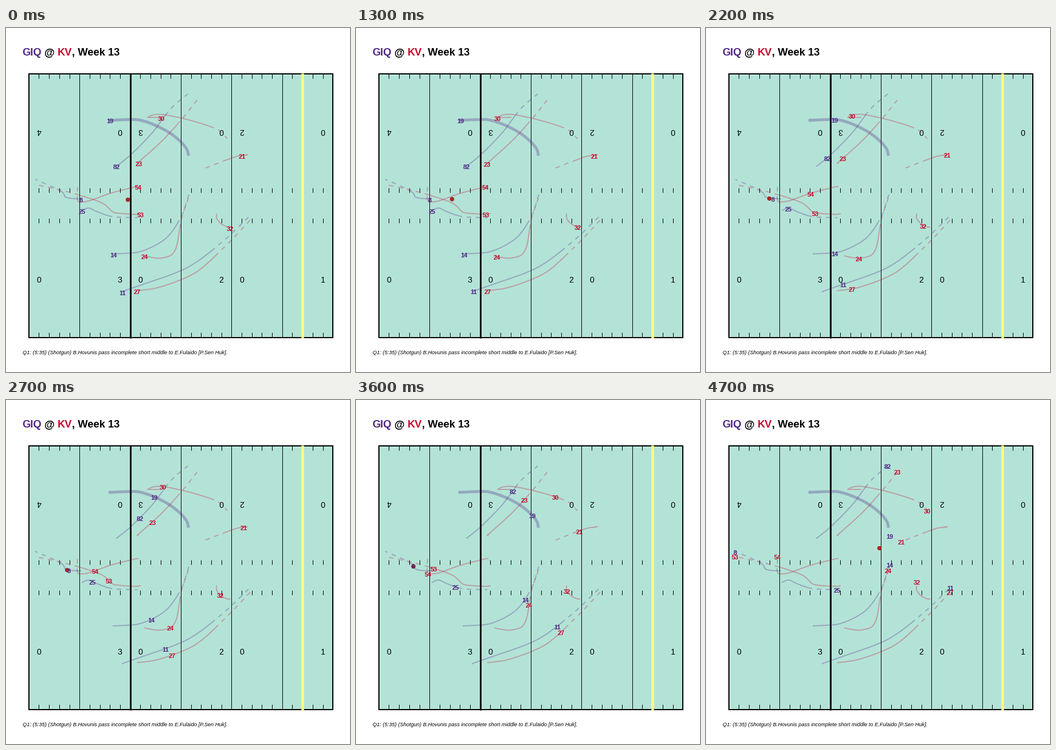
A matplotlib script for the animation above (5800 ms loop, 600 by 600 pixels).

```python
import numpy as np
import matplotlib.pyplot as plt
from matplotlib.animation import FuncAnimation
from matplotlib.patches import Circle, Rectangle

PX = 0.72                      # points per pixel at 100 dpi
LAST, THROW = 47, 37           # final moving step, time of the pass
PURPLE, RED, FIELD = "#4f2683", "#c60c30", "#b3e3d7"
LEFT, RIGHT, TOP, BOTTOM = 39.8, 570.2, 80, 540

plt.rcParams["font.family"] = "Liberation Sans"

# Player positions at the key times, in pixels.
KEYS = (0, 5, 13, 22, 31, 40, 47)
OFFENSE = {
    19: [(181, 161), (181, 161), (182, 161), (224, 159.5), (284, 182), (317, 216), (320, 237)],
    82: [(193, 241), (193, 241), (193, 241), (212, 226), (254, 184), (289, 139), (317, 115)],
    11: [(203, 460), (203, 460), (205, 459), (239, 447), (314, 419), (379, 371.5), (426, 327)],
    14: [(187, 394), (187, 394), (188, 394), (224, 392), (275, 370), (307, 326), (320, 287)],
    25: [(133, 318), (133, 318), (133, 318), (144, 314), (158, 320), (190, 329.5), (229, 331)],
    8: [(131, 298), (130, 298), (129, 298), (117, 297.5), (104, 295), (88, 280.5), (51, 264)],
}
DEFENSE = {
    30: [(271, 156), (263, 156), (247, 156), (255, 152), (305, 157), (372, 179), (386, 193)],
    23: [(232, 235.5), (229, 235.5), (229, 236), (239, 227), (273, 196), (310, 155), (334, 125)],
    54: [(231, 276.5), (229, 276.5), (226, 277), (183, 288), (137, 303), (124, 296), (125, 273)],
    53: [(235, 324), (234, 324), (227, 325), (191, 322.5), (169, 306), (103, 284.5), (51, 273)],
    24: [(242, 397.5), (242, 397.5), (246, 398.5), (267, 401.5), (297, 382.5), (306, 333.5), (318, 297)],
    27: [(229, 458), (229, 458), (230, 458), (255, 455), (323, 431), (384, 379), (426, 335)],
    21: [(412, 223), (414, 222), (416, 222), (421, 221), (406, 223), (373, 234.5), (341, 247)],
    32: [(391, 348), (390, 347), (387, 347), (379, 344), (370, 336), (367, 329), (368, 316)],
}
# One more (time, x, y) where a route bends sharply.
BENDS = {8: (36, 100, 288), 30: (26, 268, 150.5), 54: (34, 128, 303.5), 24: (27, 287, 397)}
BALL = np.array([(0, 212.5, 299.5), (10, 212.5, 299.5), (13, 167.5, 298.5), (16, 129, 298),
                 (22, 110.5, 297.5), (31, 103.5, 296), (37.6, 99, 288.5),
                 (40, 151.5, 282), (47, 302.5, 258.5)])


def smooth(t, keys, vals):
    """Monotone cubic interpolation."""
    h = np.diff(keys)
    s = np.diff(vals) / h
    a, b = s[:-1], s[1:]
    same = a * b > 0
    inner = np.where(same, 2 * a * b / np.where(same, a + b, 1), 0)
    d = np.concatenate([s[:1], inner, s[-1:]])
    i = np.clip(np.searchsorted(keys, t, side="right") - 1, 0, len(h) - 1)
    u = (t - keys[i]) / h[i]
    return (vals[i] * (1 + 2 * u) * (1 - u) ** 2 + h[i] * d[i] * u * (1 - u) ** 2
            + vals[i + 1] * u * u * (3 - 2 * u) + h[i] * d[i + 1] * u * u * (u - 1))


def make_route(number, points):
    rows = [(k, x, y) for k, (x, y) in zip(KEYS, points)]
    if number in BENDS:
        rows.append(BENDS[number])
    keys, xs, ys = np.array(sorted(rows), float).T
    return lambda t: (smooth(t, keys, xs), smooth(t, keys, ys))


fig = plt.figure(figsize=(6, 6), dpi=100, facecolor="white")
ax = fig.add_axes([0, 0, 1, 1])
ax.set(xlim=(0, 600), ylim=(600, 0))
ax.axis("off")


def line(x, y, width, color="black", **kw):
    kw.setdefault("solid_capstyle", "butt")
    ax.plot(x, y, color=color, lw=width * PX, **kw)


def label(x, y, s, size, **kw):
    return ax.text(x, y, s, fontsize=size * PX, **kw)


def centred(x, y, s, size, **kw):
    return label(x, y, s, size, ha="center", va="center_baseline",
                 rotation_mode="anchor", **kw)


def yard_x(i):
    return LEFT + i * (RIGHT - LEFT) / 30


def draw_field():
    ax.add_patch(Rectangle((LEFT, TOP), RIGHT - LEFT, BOTTOM - TOP, fc=FIELD, lw=0))
    for i in range(1, 30):
        x = yard_x(i)
        if i % 5 == 0:
            line([x, x], [TOP, BOTTOM], 1)
        else:
            for y0, y1 in ((80, 88), (279, 287), (332, 340), (531, 540)):
                line([x, x], [y0, y1], 1)
    for y in (TOP, BOTTOM):
        line([LEFT - 1, RIGHT + 1], [y, y], 2)
    for x in (LEFT, RIGHT):
        line([x, x], [TOP, BOTTOM], 2)
    for i, upper, lower in ((1, "4", "0"), (9, "0", "3"), (11, "3", "0"),
                            (19, "0", "2"), (21, "2", "0"), (29, "0", "1")):
        centred(yard_x(i), 181, upper, 14.3, rotation=180)
        centred(yard_x(i), 438.5, lower, 14.3)
    line([yard_x(10)] * 2, [TOP - 1, BOTTOM + 1], 3)
    line([yard_x(27)] * 2, [TOP - 1, BOTTOM + 1], 4.5, "#ffff78")


def draw_trail(route, color, width):
    before = np.linspace(0, THROW, 180)
    after = np.linspace(THROW, LAST, 60)
    line(*route(before), width, color, alpha=0.3, zorder=3)
    line(*route(after), width, color, alpha=0.3, zorder=3,
         ls=(0, (4, 4)), dash_capstyle="butt")


draw_field()

for x, s, color in ((28, "GIQ", PURPLE), (66.7, "@", "black"),
                    (89.7, "KV", RED), (115.1, ", Week 13", "black")):
    label(x, 48, s, 18.33, color=color, weight="bold")
label(29, 569, "Q1: (5:35) (Shotgun) B.Hovunis pass incomplete short middle "
      "to E.Fulaido [P.Sen Huk].", 9.28, style="italic")

players = []
for team, color in ((OFFENSE, PURPLE), (DEFENSE, RED)):
    for number, points in team.items():
        route = make_route(number, points)
        draw_trail(route, color, 5 if number == 19 else 2)
        tag = centred(0, 0, str(number), 11, color=color, weight="bold", zorder=6)
        players.append((route, tag))

ball = ax.add_patch(Circle((0, 0), 3.3, fc="#b22222", ec="#8b1a1a", lw=0.6, zorder=5))


def update(i):
    t = i if i < LAST else LAST
    for route, tag in players:
        x, y = route(t)
        tag.set_position((float(x), float(y) + 1.5))
    ball.center = tuple(np.interp(t, BALL[:, 0], BALL[:, k]) for k in (1, 2))
    return [tag for _, tag in players] + [ball]


anim = FuncAnimation(fig, update, frames=58, interval=100, repeat=True, repeat_delay=0)
plt.show()
```
